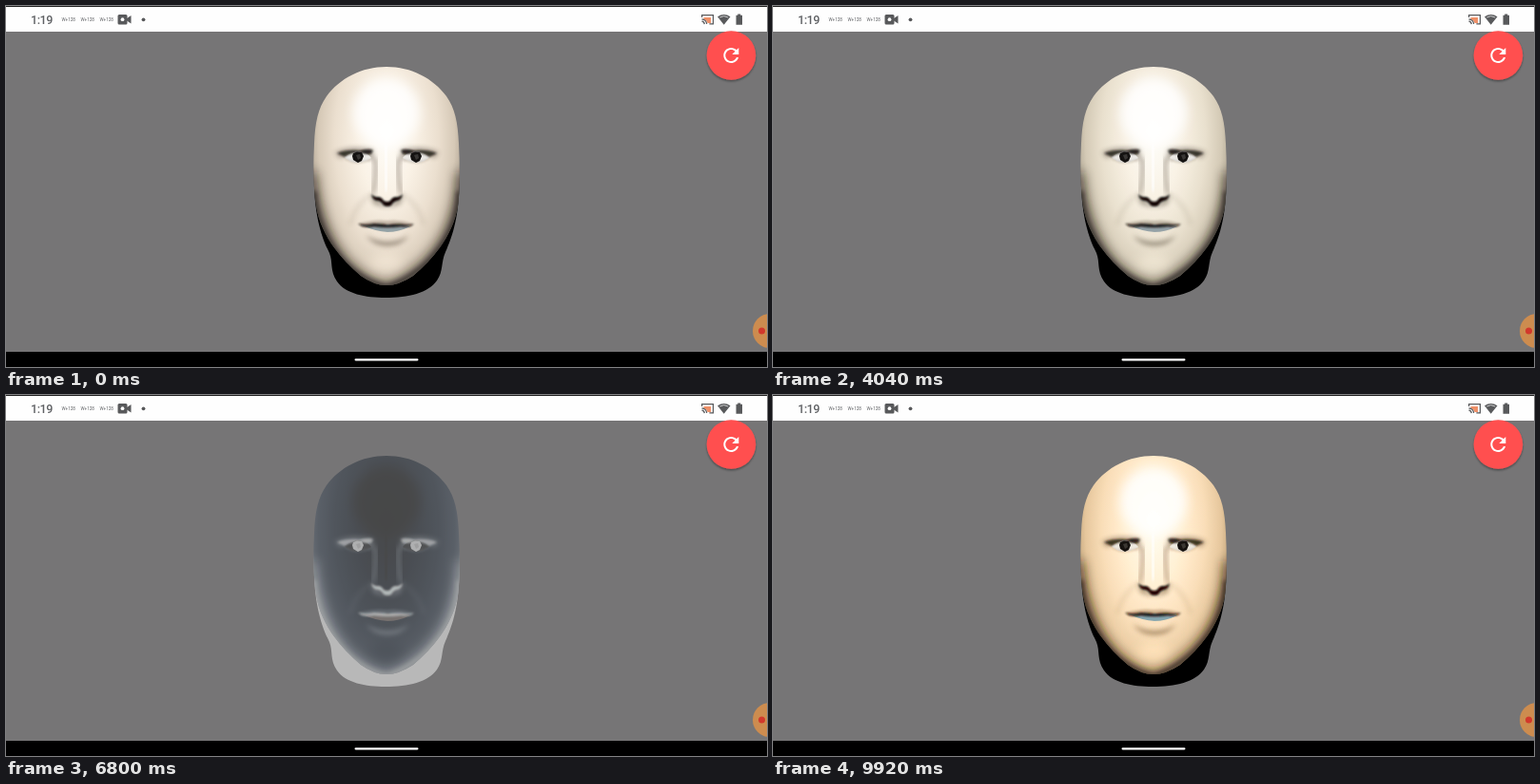
These frames come from a looping animation (800x380 px, 10000 ms). An HTML page:

```html
<!DOCTYPE html>
<html lang="en">
<head>
<meta charset="utf-8">
<title>Head colour effects</title>
<style>
  html, body { margin: 0; width: 100%; height: 100%; overflow: hidden; background: #767576; }
  svg { position: absolute; left: 0; top: 0; width: 800px; height: 380px; }
  text { font-family: Roboto, sans-serif; fill: #5f6164; }
</style>
</head>
<body>
<svg viewBox="0 0 800 380">
  <rect width="800" height="27" fill="#fefefe"/>
  <rect width="800" height="1" fill="#222"/>
  <rect y="364" width="800" height="16"/>
  <rect x="366.500" y="371.200" width="67" height="2.200" rx="1.100" fill="#fff"/>

  <text x="26" y="19" font-size="12.500" font-weight="500" letter-spacing="-.4">1:19</text>
  <g font-size="4.600">
    <text x="58.500" y="16">W+128</text>
    <text x="78.500" y="16">W+128</text>
    <text x="98.500" y="16">W+128</text>
  </g>
  <g fill="#58595b">
    <rect x="117.500" y="9" width="10" height="10.500" rx="1.500"/>
    <path d="M127 13l4.500-3v8.500l-4.500-3z"/>
    <circle cx="122.500" cy="14.200" r="1.900" fill="#fff"/>
    <circle cx="144.500" cy="14.300" r="1.900"/>
    <path d="M748 11.200Q754.700 6.600 761.500 11.200L754.700 19.800z"/>
    <path d="M750.300 12Q754.700 9.200 759.200 12" fill="none" stroke="#fff" stroke-width=".7"/>
    <path d="M767.500 9.800h1.700V8.500h3v1.300h1.800v10h-6.500z"/>
  </g>
  <path d="M733.500 12h7.500v6h-3.500q-.5-3-4-4z" fill="#ee9068"/>
  <g fill="none" stroke="#58595b" stroke-width="1.200">
    <path d="M731.600 12V9.600h11.800v9.300h-4M731.500 13.800q4.700.4 5.200 5.200M731.500 16.200q2.500.3 2.800 2.900"/>
  </g>

  <filter id="drop" x="-30%" y="-30%" width="160%" height="160%">
    <feDropShadow dx="0" dy="1.500" stdDeviation="1.300" flood-opacity=".4"/>
  </filter>
  <circle cx="762.400" cy="52" r="25.800" fill="#ff5050" filter="url(#drop)"/>
  <path transform="translate(750.300 40)" fill="#fff" d="M17.650 6.350C16.200 4.900 14.210 4 12 4c-4.420 0-7.990 3.580-7.990 8s3.570 8 7.990 8c3.730 0 6.840-2.550 7.730-6h-2.080c-.82 2.330-3.040 4-5.650 4-3.310 0-6-2.690-6-6s2.690-6 6-6c1.660 0 3.140.69 4.220 1.780L13 11h7V4z"/>
  <circle cx="803" cy="342" r="18" fill="#cd8c4f"/>
  <circle cx="794.500" cy="342" r="3.500" fill="#d2382c"/>
</svg>

<svg id="head" viewBox="0 0 800 380">
  <defs>
    <radialGradient id="skin" gradientUnits="userSpaceOnUse" cx="0" cy="0" r="1"
        gradientTransform="translate(400 140) scale(84 172)">
      <stop offset="0" stop-color="#fffdf8"/>
      <stop offset=".35" stop-color="#faf2e6"/>
      <stop offset=".65" stop-color="#ebdfcf"/>
      <stop offset=".85" stop-color="#d6c9b7"/>
      <stop offset="1" stop-color="#a89c8b"/>
    </radialGradient>
    <filter id="b1" x="-50%" y="-100%" width="200%" height="300%"><feGaussianBlur stdDeviation=".8"/></filter>
    <filter id="b3" x="-60%" y="-100%" width="220%" height="300%"><feGaussianBlur stdDeviation="2.500"/></filter>
    <filter id="b6" x="-60%" y="-60%" width="220%" height="220%"><feGaussianBlur stdDeviation="6"/></filter>
    <path id="face" d="M400 64C426 64 449 76 463 95C472 108 475 122 476 145Q478 185 475 210C471 238 452 264 428 284Q413 294 400 294Q387 294 373 284C349 264 330 238 326 210Q322 185 324 145C325 122 328 108 337 95C351 76 374 64 400 64Z"/>
    <clipPath id="inside"><use href="#face"/></clipPath>

    <g id="side">
      <path d="M346 154Q362 146 386 151L387 163Q372 154 350 160Z" fill="#4c4034" opacity=".42" filter="url(#b3)"/>
      <path d="M388 160Q390 175 386 197" fill="none" stroke="#6e6152" stroke-width="5" opacity=".42" filter="url(#b3)"/>
      <path d="M382 199Q366 212 362 230" fill="none" stroke="#8b7b68" stroke-width="4" opacity=".16" filter="url(#b3)"/>
      <path d="M356 159Q363 153 372 153Q380 154 384 160Q377 165 368 165Q360 164 356 159Z" fill="#ebe9e5"/>
      <path d="M348 155Q362 149 385 154Q381 157 374 155Q364 153 356 159Z" fill="#18120d" opacity=".78" filter="url(#b1)"/>
      <path d="M372 153Q381 149 386 152L383 156Z" fill="#120d09" opacity=".8" filter="url(#b1)"/>
      <path d="M357 161Q368 168 383 162" fill="none" stroke="#8f8070" opacity=".6" filter="url(#b1)"/>
    </g>
    <g id="pupil">
      <path d="M-5-4L-1-5.500L4-5L6-1L4 4L0 6L-5 3L-6-1Z" fill="#151312"/>
      <path d="M-2-2L2-3L3 1L0 3Z" fill="#393735"/>
    </g>
  </defs>

  <path d="M324 165C322 215 331 242 340 260C344 270 340 278 348 290C357 303 378 307 399 307C423 307 444 302 453 289C460 279 457 270 462 259C470 241 479 215 476 165Z"/>
  <use href="#face" fill="url(#skin)"/>

  <g clip-path="url(#inside)">
    <ellipse cx="400" cy="112" rx="35" ry="36" fill="#fff" opacity=".85" filter="url(#b6)"/>
    <path d="M321 175Q324 222 345 255T400 297Q432 285 455 255T479 175" fill="none" stroke="#1d150e" stroke-width="11" opacity=".62" filter="url(#b6)"/>
    <path d="M324 195Q325 226 345 256T400 296Q434 284 455 256T476 195" fill="none" stroke="#000" stroke-width="4" opacity=".65" filter="url(#b3)"/>

    <use href="#side"/>
    <use href="#side" transform="translate(801) scale(-1 1)"/>
    <use href="#pupil" x="370" y="159"/>
    <use href="#pupil" x="431" y="159"/>

    <path d="M399 145Q400 175 400 195" fill="none" stroke="#fff" stroke-width="9" opacity=".6" filter="url(#b3)"/>
    <path d="M383 196Q390 206 401 211Q411 206 418 196L415 208Q401 215 386 208Z" fill="#3d3022" opacity=".45" filter="url(#b3)"/>
    <path d="M384 198Q387 202 391 201Q395 201 397 205Q401 207 404 205Q406 201 410 201Q414 202 417 198Q416 204 411 205Q407 206 405 210Q401 212 397 210Q394 205 390 205Q385 204 384 198Z" fill="#080503" filter="url(#b1)"/>
    <path d="M400 213V225" stroke="#8b7a66" stroke-width="4" opacity=".28" filter="url(#b3)"/>

    <path d="M371 229Q388 224 400 226Q414 224 428 229L425 233H375Z" fill="#867564" opacity=".4" filter="url(#b1)"/>
    <path d="M377 232Q401 229 425 232Q413 238 401 238Q388 237 377 232Z" fill="#93a1a5"/>
    <path d="M370 229Q377 231 387 229Q396 229 401 230.500Q407 229 415 229.500Q424 231 429 229.500Q425 233 415 232Q401 234 387 232Q375 234 370 229Z" fill="#15100c" filter="url(#b1)"/>
    <path d="M379 235Q388 239 401 239Q414 239 423 235Q415 244 401 244Q387 243 379 235Z" fill="#eee3d5" opacity=".85" filter="url(#b1)"/>
    <path d="M378 241Q389 248 401 248Q413 248 424 241Q416 253 401 253Q386 253 378 241Z" fill="#57493a" opacity=".5" filter="url(#b3)"/>
    <ellipse cx="400" cy="270" rx="17" ry="9" fill="#fff3e2" opacity=".5" filter="url(#b6)"/>
  </g>
</svg>

<script>
const head = document.getElementById('head');
const wave = p => 1 - Math.abs(2 * p - 1);

// Each effect runs until its end time; p goes from 0 to 1 meanwhile.
const effects = [
  [2000, p => `grayscale(${wave(p)})`],
  [4000, p => `contrast(${1 - 0.39 * wave(p)})`],
  [5000, p => `hue-rotate(${130 * p}deg)`],
  [7500, p => `invert(${p})`],
  [10000, p => `saturate(${1 + 1.4 * p})`]
];

function draw(now) {
  const t = now % 10000;
  const i = effects.findIndex(([end]) => t < end);
  const start = i ? effects[i - 1][0] : 0;
  const [end, effect] = effects[i];
  head.style.filter = effect((t - start) / (end - start));
  requestAnimationFrame(() => draw(performance.now()));
}
draw(0);
</script>
</body>
</html>
```
